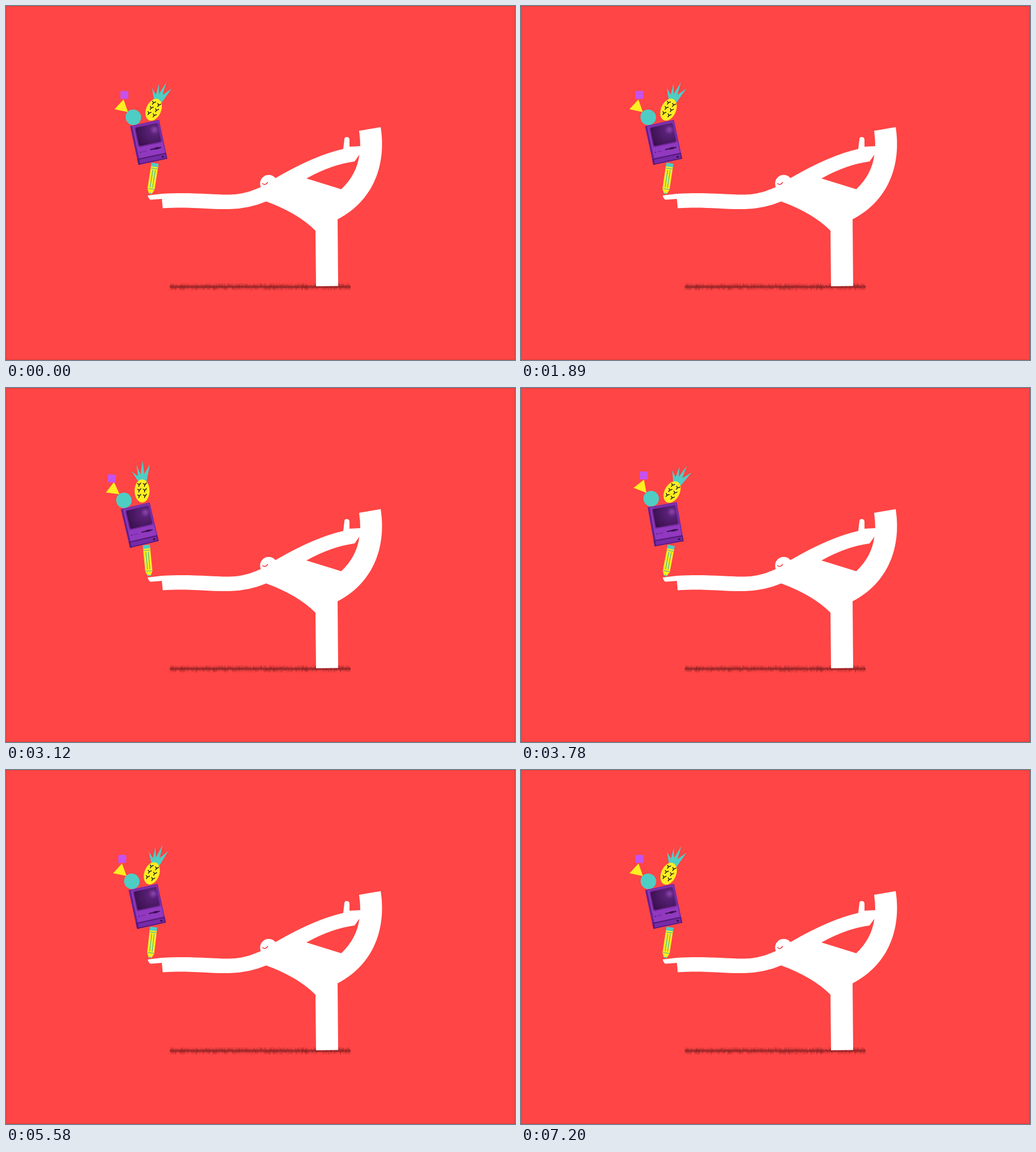
Write an HTML page with a canvas that moves like this. It is 898 px wide and 624 px high and loops after 7230 ms.

```html
<!DOCTYPE html>
<html lang="en">
<head>
<meta charset="utf-8">
<title>Balancing act</title>
<style>
html, body { margin: 0; width: 100%; height: 100%; overflow: hidden; background: #ff4545; }
canvas { display: block; width: 898px; height: 624px; }
</style>
</head>
<body>
<canvas id="stage" width="898" height="624"></canvas>
<script>
const W = 898, H = 624;
const LOOP = 7230, SWING = 3600, STEP = 30;
const RED = '#ff4545', WHITE = '#fff', TEAL = '#4ecdc4', YELLOW = '#ffee22', VIOLET = '#c552f0';
const STRIPE = '#45b89a', INK = '#20201c', DARK = '#3b1050';
const ctx = document.getElementById('stage').getContext('2d');

function ease(from, to, t) {
  const u = Math.min(1, Math.max(0, (t - from) / (to - from)));
  return u * u * (3 - 2 * u);
}

// Pencil tilt: rest on the right, tip over, then swing left; the way back mirrors it
function tiltAt(t) {
  const u = Math.abs((t - 940 + SWING * 1.5) % SWING - SWING / 2);
  return 16.4 - 5.5 * ease(330, 760, u) - 23.5 * ease(750, 1800, u);
}

function at(x, y, angle, draw) {
  ctx.save();
  ctx.translate(x, y);
  ctx.rotate(angle * Math.PI / 180);
  draw();
  ctx.restore();
}

function fill(path, color) {
  ctx.fillStyle = color;
  ctx.fill(new Path2D(path), 'evenodd');
}

function line(path, color, width) {
  ctx.strokeStyle = color;
  ctx.lineWidth = width;
  ctx.lineCap = ctx.lineJoin = 'round';
  ctx.stroke(new Path2D(path));
}

function box(x, y, w, h, color) {
  ctx.fillStyle = color;
  ctx.fillRect(x, y, w, h);
}

function roundBox(x, y, w, h, r, color) {
  ctx.fillStyle = color;
  ctx.beginPath();
  ctx.roundRect(x, y, w, h, r);
  ctx.fill();
}

function oval(rx, ry, color) {
  ctx.fillStyle = color;
  ctx.beginPath();
  ctx.ellipse(0, 0, rx, ry, 0, 0, 7);
  ctx.fill();
}

function randomFrom(seed) {
  return () => (seed = (seed * 16807) % 2147483647) / 2147483647;
}

function shadow() {
  const rand = randomFrom(77);
  for (let i = 0; i < 1500; i++) {
    const x = 289 + rand() * 318;
    const reach = (2 + rand() * 4.5) * (i % 2 ? 1 : -1);
    line(`M${x} 495l${(rand() - 0.5) * 5} ${reach}`, `rgba(125,32,36,${0.05 + rand() * 0.2})`, 1);
  }
  line('M291 495H606', 'rgba(135,34,38,.6)', 4.5);
}

const bodyPath =
  'M250 334L275 331C330 328 365 333 395 332.5C422 331.5 435 325 450 319L476 303' +
  'Q545 263 595 252L597 235Q597 231 601 231Q606 231 606 236V248L625 247Q625 234 623 220L661 213.5' +
  'C670 269 656 339 585 376L586 493.5L547 494L546 396Q515 365 459 344.5Q430 357 395 358' +
  'C355 359 325 353 276.5 356.5L275 340L255 341.5Q252 341 250 334Z' +
  'M530 304L591.5 323Q619 297 623.5 262L615 274Q574 279.5 530 304Z';

function body() {
  fill(bodyPath, WHITE);
  at(463.5, 313, 0, () => oval(15.2, 15.2, WHITE));
  line('M452.5 313Q457.5 317 461.5 311', '#e8393d', 1.6);
}

function pencil() {
  fill('M-2.5 0L-6.3 -8V-49H6.3V-8L2.5 0Z', YELLOW);
  box(-6.3, -54.5, 12.6, 6.5, TEAL);
  line('M-2 -42V-12M2.3 -42V-12', STRIPE, 1.3);
  line('M-5.5 -45H5.5M-5.5 -8.5H5.5', STRIPE, 1.2);
  line('M-1.8 -.8H1.8', TEAL, 1.8);
}

function computer() {
  box(-26, -35, 52, 70, '#9139bf');
  box(-26, -35, 3.5, 70, '#64208f');
  box(-26, -35, 52, 2, '#712aa0');
  box(24.3, -35, 1.7, 60, '#7529a5');
  roundBox(-20, -32, 44, 37, 3, '#76299f');
  const glass = ctx.createRadialGradient(15, -20, 1, 12, -17, 34);
  glass.addColorStop(0, '#8a42a8');
  glass.addColorStop(0.22, '#592178');
  glass.addColorStop(1, '#390f4b');
  roundBox(-18, -30, 40, 33, 3, glass);
  box(0, 12, 20, 2, DARK);
  box(8, 11.3, 8, 3.4, DARK);
  box(-19, 13, 2.2, 2.2, '#5b1e82');
  line('M-14 14H-7', '#6c2795', 1);
  box(-26, 24, 52, 11, '#551a7a');
  box(-23, 26.2, 47, 7, '#782aa8');
  box(17, 28.5, 4, 3, DARK);
}

function pineapple() {
  fill('M-7 -17L-18 -34L-7 -26L-10 -46L-2.5 -29L1 -53.5L4 -30L14 -47L8 -17Z', TEAL);
  oval(13.2, 20.3, YELLOW);
  for (const y of [-11, -1, 9])
    for (const x of [-5, 5])
      line(`M${x - 2.8} ${y - 2}L${x} ${y}L${x + 2.8} ${y - 3}M${x} ${y}l-.8 3`, INK, 1.5);
}

// Each object stands on the one below; "tip" is how far the top has rolled upright
function stack(p) {
  const tip = Math.max(0, (p - 9) / 7.4) ** 1.5;
  const screen = -12.8 + 0.08 * p + 14.2 * tip;
  const roll = -40 - 0.7 * p + 62 * tip;
  const wedge = -52 + 0.35 * p + 63 * tip;
  const perch = -20.5 + p + 9 * tip;
  const block = 2.7 - 0.3 * p - 8 * tip;
  const fruit = 9 + 1.65 * p + 11 * tip;

  at(253.5 + 0.12 * p, 331, p, () => {
    pencil();
    at(0, -54, screen - p, () => at(-3, -37.8 - 0.1 * p, 0, () => {
      at(11.5 - 0.3 * p + 3 * tip, -38.3, fruit - screen, () => at(0, -20, 0, pineapple));
      computer();
      at(-17.3, -49, roll - screen, () => {
        at(0, -13.2, wedge - roll, () => {
          fill('M0 0L-11.7 -21.2L11.7 -20.5Z', YELLOW);
          at(0, 0, perch - wedge, () =>
            at(0, -31, block - perch, () => box(-7, -7, 14, 14, VIOLET)));
        });
        oval(13.6, 13.8, TEAL);
      });
    }));
  });
}

function draw(t) {
  box(0, 0, W, H, RED);
  ctx.strokeStyle = '#d93b3b';
  ctx.lineWidth = 1;
  ctx.strokeRect(0.5, 0.5, W - 1, H - 1);
  shadow();
  stack(tiltAt(t));
  body();
}

const start = performance.now();
function tick() {
  const elapsed = (performance.now() - start) % LOOP;
  draw(Math.floor(elapsed / STEP) * STEP % SWING);
  requestAnimationFrame(tick);
}
tick();
</script>
</body>
</html>
```
